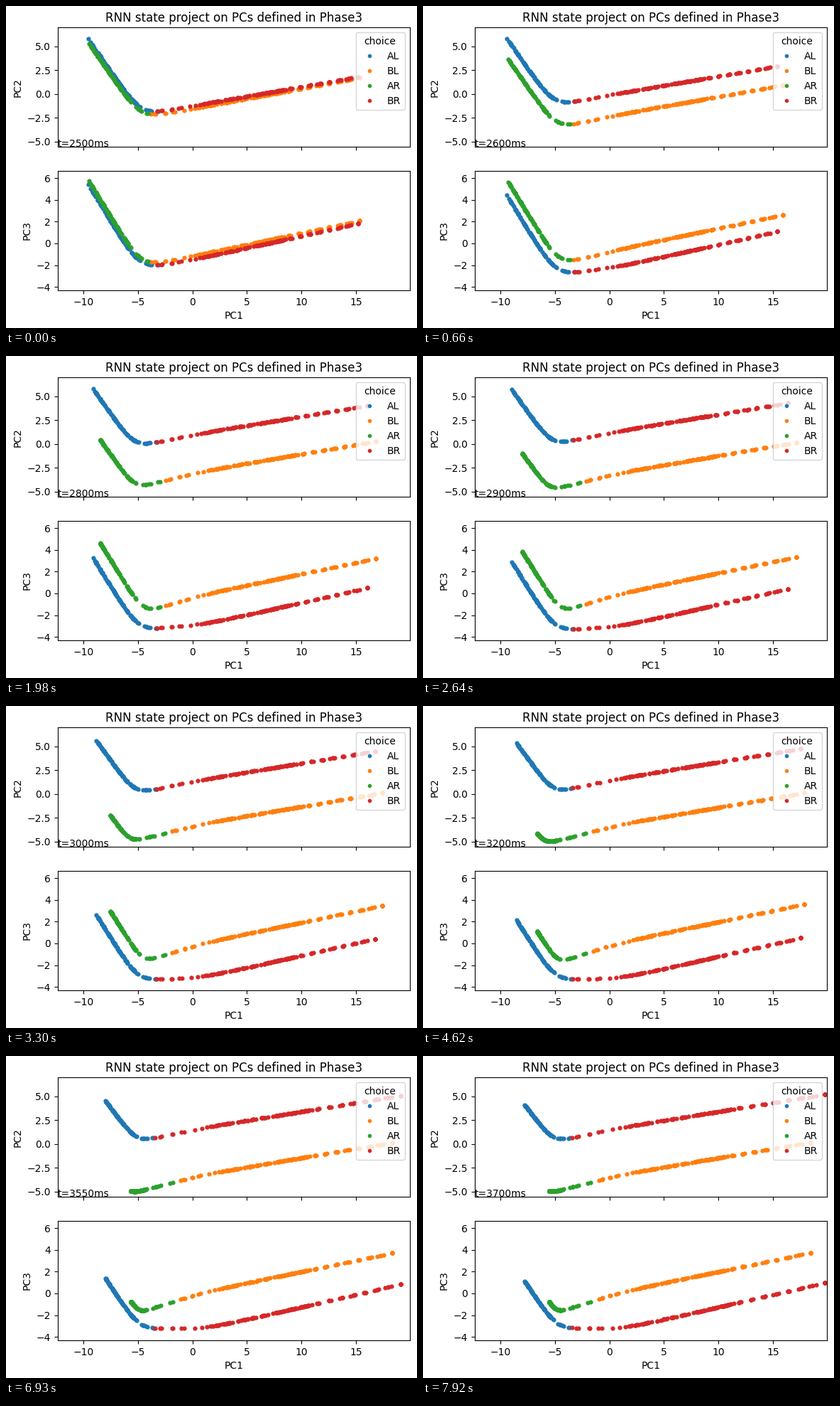
Recreate the animation shown at these times as a matplotlib script. Size 579 px wide and 453 px high, loop 8000 ms.

```python
import numpy as np
import matplotlib.pyplot as plt
from matplotlib.animation import FuncAnimation

W, H, DPI = 579, 453, 100
LOOP, TICK, HOLD, LAST = 8000, 40, 330, 24   # ms, ms, ms, steps


def settle(step, tau):
    return 1 - np.exp(-step / tau)


def swing(step, length):
    return np.sin(np.pi / 2 * min(step / length, 1))


def bend(x, x0, y0, fall, base, slope, curl, soft):
    """Steep line falling from (x0, y0), blended into a gently curled arm."""
    left = y0 - fall * (x - x0)
    right = base + slope * (x - 1) + curl * (np.hypot(x - 1, 2) - 2)
    return soft * np.logaddexp(left / soft, right / soft)


def state(step):
    """PC1, PC2 and PC3 of all trials for each choice."""
    p = step / LAST
    fast, slow = settle(step, 3.7), settle(step, 11)
    fall = 1.66 - .16 * p

    # AL and BR share one curve, AR and BL the other
    x_al = -9.58 + .075 * step
    x_ar = -9.51 + 3.98 * swing(step, LAST) ** 1.4

    def first(x):
        soft = 1.2 - .45 * slow
        pc2 = bend(x, x_al, 5.8 + .02 * step - .0038 * step ** 2, fall,
                   -1.04 + 2.74 * fast, .2 + .013 * fast, -.0286 * fast, soft)
        pc3 = bend(x, x_al, 5.45 - 2 * fast - .098 * step, fall,
                   -1.27 - 1.85 * fast, .2 - .108 * slow, .02 + .12 * slow, soft)
        return x, pc2, pc3

    def second(x):
        soft = 1.2 - .8 * slow
        pc2 = bend(x, x_ar, 5.3 - 10.7 * swing(step, 20), fall,
                   -1.32 - 1.95 * fast, .21 + .036 * fast, -.055 * fast, soft)
        pc3 = bend(x, x_ar, 5.75 - 6.6 * swing(step, 22) ** 2, fall,
                   -.95 + fast, .21 + .054 * fast, -.06 * fast, soft)
        return x, pc2, pc3

    def spread(start, end, trials, power=1):
        return start + (end - start) * trials ** power

    return {
        "AL": first(spread(x_al, -3.09 - .023 * step, a_trials, .93 + .018 * step)),
        "BL": second(spread(-3.84 + 3.26 * slow, 15.33 + 3.52 * slow,
                            b_trials, 1 + .005 * step)),
        "AR": second(spread(x_ar, -4.1 + 2.67 * slow, a_trials, 1 + .09 * step)),
        "BR": first(spread(-3.22 - .01 * step, 15.23 + 4.56 * p ** 1.25, b_trials)),
    }


# Place of every trial along its stretch: dense middles, loose ends
rng = np.random.default_rng(4)
a_trials = np.concatenate([[0, 1], rng.uniform(0, .68, 90), rng.uniform(.68, 1, 9)])
clusters = np.repeat(np.linspace(.66, 1, 8), 4) + rng.normal(0, .008, 32)
b_trials = np.concatenate([[0, 1], rng.uniform(0, .3, 18),
                           rng.uniform(.25, .64, 75), clusters.clip(0, 1)])

fig = plt.figure(figsize=((W + 1e-6) / DPI, (H + 1e-6) / DPI), dpi=DPI)
top = fig.add_axes([72.75 / W, 254.7 / H, 496 / W, 168 / H])
low = fig.add_axes([72.75 / W, 53.1 / H, 496 / W, 168 / H], sharex=top)
top.set(xlim=(-12.38, 19.95), ylim=(-5.55, 6.98), ylabel="PC2",
        title="RNN state project on PCs defined in Phase3")
low.set(ylim=(-4.31, 6.67), xlabel="PC1", ylabel="PC3")
top.tick_params(labelbottom=False)

dots = {name: [ax.plot([], [], ".", ms=7, label=name)[0] for ax in (top, low)]
        for name in ("AL", "BL", "AR", "BR")}
legend = top.legend(title="choice", loc="upper right")
for handle in legend.legend_handles:
    handle.set_markersize(6)
clock = top.text(0, 0, "", transform=top.transAxes)


def update(frame):
    step = min((frame * TICK + 30) // HOLD, LAST)
    for name, (pc1, pc2, pc3) in state(step).items():
        dots[name][0].set_data(pc1, pc2)
        dots[name][1].set_data(pc1, pc3)
    clock.set_text(f"t={2500 + 50 * step}ms")
    return [clock, *(d for pair in dots.values() for d in pair)]


anim = FuncAnimation(fig, update, frames=LOOP // TICK, interval=TICK,
                     repeat=True, repeat_delay=0)
plt.show()
```
